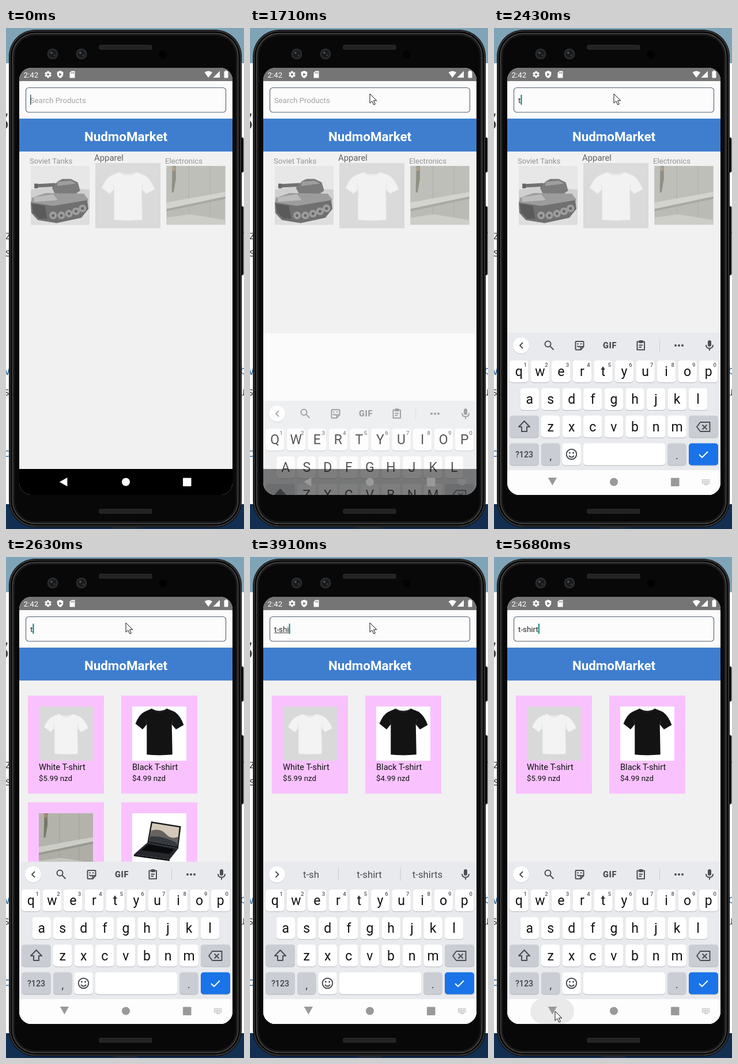
An HTML page for the animation above (5750 ms loop, 413 px wide and 868 px high).

```html
<!DOCTYPE html>
<html lang="en">
<head>
<meta charset="utf-8">
<title>Product search</title>
<style>
  html, body { margin: 0; width: 100%; height: 100%; overflow: hidden; background: #fff; }
  svg { display: block; width: 413px; height: 868px; font-family: Roboto, "Open Sans", sans-serif; }
  .page { font-family: "Open Sans", "Noto Sans", sans-serif; font-size: 20px; fill: #444; }
  .page .link { fill: #27649b; }
  .mid { text-anchor: middle; }
  .line { fill: none; stroke: #4b4e52; stroke-width: 2; stroke-linejoin: round; }
</style>
</head>
<body>
<svg id="stage" viewBox="0 0 413 868" xmlns="http://www.w3.org/2000/svg"></svg>
<script>
const LOOP = 5750;
const stage = document.getElementById('stage');

const rect = (x, y, w, h, fill, r = 0, more = '') =>
  `<rect x="${x}" y="${y}" width="${w}" height="${h}" rx="${r}" fill="${fill}" ${more}/>`;
const circle = (x, y, r, fill, more = '') =>
  `<circle cx="${x}" cy="${y}" r="${r}" fill="${fill}" ${more}/>`;
const path = (d, fill, more = '') => `<path d="${d}" fill="${fill}" ${more}/>`;
const line = (d, more = '') => `<path class="line" d="${d}" ${more}/>`;
const text = (x, y, size, fill, content, more = '') =>
  `<text x="${x}" y="${y}" font-size="${size}" fill="${fill}" ${more}>${content}</text>`;
const group = (id, content, more = '') => `<g id="${id}" ${more}>${content}</g>`;
const place = (x, y, size, content, more = '') =>
  `<g transform="translate(${x} ${y}) scale(${size / 100})" ${more}>${content}</g>`;

// Pictures, each drawn in a 100 x 100 box
const shirt = 'M37 14Q50 21 63 14L76 19Q86 26 91 40L78 47L71 39L72 87Q50 89 29 87L29 39L22 47L10 38Q16 23 25 19Z';
const whiteShirt = rect(0, 0, 100, 100, '#d9d9da') +
  path(shirt, '#f3f3f4', 'stroke="#e9e9eb"') +
  path('M37 14Q50 25 63 14M29 39L27 31M71 39L73 31', 'none', 'stroke="#e3e3e6"');
const blackShirt = rect(0, 0, 100, 100, '#fff') +
  `<g transform="translate(-5 -12.3) scale(1.1 1.16)">${path(shirt, '#131313')}` +
  path('M37 14Q50 25 63 14M29 39L27 31M71 39L73 31', 'none', 'stroke="#2c2c2c"') + '</g>';
const shelf = rect(0, 0, 100, 100, '#aeaea7') +
  path('M0 0H100V44L0 64Z', '#b3b3ac') +
  path('M38 0V100M74 0V100', 'none', 'stroke="#a0a09a"') +
  path('M0 62L100 44V52L0 73Z', '#cdcdc7') + path('M0 73L100 52V56L0 77Z', '#989891') +
  path('M0 88L40 82L100 92V100H0Z', '#c6c6c0') +
  path('M10 0H16V22L12 45H9Z', '#77776a') + rect(10, 1, 5, 7, '#a18e72');
const tank = rect(0, 0, 100, 100, '#e6e6e6') + path('M0 40L30 36L100 40V74H0Z', '#c9c9c9') +
  path('M0 74H100V100H0Z', '#dadada') +
  path('M8 31L42 29V35L8 37Z', '#555') + rect(6, 30, 6, 8, '#484848') +
  path('M36 37L46 26L54 22H68L80 28L84 42L74 49H42Z', '#626262') +
  path('M46 27L68 25L77 30L45 34Z', '#8d8d8d') +
  path('M2 54L25 46L90 47L98 57L92 65L44 70L0 64Z', '#8a8a8a') +
  path('M5 53L38 48L46 58L6 61Z', '#b0b0b0') +
  path('M0 62L38 68L96 58L98 73L86 88L44 97L12 92L1 80Z', '#545454') +
  path('M2 64L24 68L28 90L14 89L4 78Z', '#393939') +
  [[38, 84], [52, 84], [65, 81], [77, 77], [88, 72]]
    .map(([x, y]) => circle(x, y, 6.5, '#8c8c8c') + circle(x, y, 2.5, '#4a4a4a')).join('');
const laptop = rect(0, 0, 100, 100, '#fff') +
  path('M35 15L90 24L85 65L28 54Z', '#17191c') + path('M37 18L87 26L83 61L31 51Z', '#d3c8b9') +
  path('M35 32Q52 27 62 38T85 43L83 61L31 51Z', '#67625f') + path('M33 43Q55 40 83 55V61L31 51Z', '#353a40') +
  path('M3 76L28 54L85 65L69 85Z', '#24272b') + path('M17 68L30 57L77 66L69 75Z', '#090a0c') +
  path('M3 76L69 85V88L3 79Z', '#101114');

function card(x, y, picture, name = '', price = '') {
  return rect(x, y, 132, 170, '#f9c2ff') + place(x + 19, y + 19, 94, picture) +
    text(x + 19, y + 129, 14.6, '#111', name) + text(x + 19, y + 147.5, 13.3, '#111', price);
}

function desktop() {
  return rect(0, 0, 413, 868, '#fff') + rect(0, 0, 413, 61, '#7fa3b7') + rect(0, 825, 413, 43, '#122e50') +
    '<g class="page">' +
    '<text x="-21" y="176" font-size="53" font-weight="700">s</text>' +
    '<text x="-1" y="366">z</text><text x="-1" y="396">s</text><text x="-9" y="601" class="link">w</text>' +
    '<text x="-4" y="637">s</text><text x="-4" y="743" class="link">c</text>' +
    '<text x="407" y="365">r</text><text x="406" y="600" class="link">b</text><text x="403" y="637">u</text></g>';
}

function phone() {
  const ring = (inset, color, width) =>
    rect(5 + inset, 3 + inset, 404 - 2 * inset, 862 - 2 * inset, 'none', 46 - inset, `stroke="${color}" stroke-width="${width}"`);
  const grille = y => rect(161, y, 93, 9, '#292929', 4) + rect(161, y, 93, 9, 'url(#mesh)', 4);
  const lens = x => circle(x, 45, 9.5, '#292b2d') + circle(x, 45, 6.5, '#17191b') +
    circle(x - 2, 43, 2, '#4c5054') + circle(x + 3, 47, 1.5, '#3c4043');
  const button = (y, h) => rect(406, y, 6, h, '#0b0b0b', 2, 'stroke="#3a3a3a"');
  return button(190, 60) + button(309, 119) + rect(186, 863, 43, 4, '#2a3544', 2) +
    rect(5, 3, 404, 862, '#080808', 46) + ring(2, '#3f3f3f', 1.5) + ring(6.5, '#505050', 1.5) + ring(9, '#1b1b1b', 2) +
    grille(29) + grille(833) + lens(81) + lens(131) + circle(272, 46, 7, '#020202');
}

function statusBar() {
  const teeth = [0, 60, 120].map(a => `<rect x="71.3" y="74.7" width="3.4" height="11.6" fill="#fff" transform="rotate(${a} 73 80.5)"/>`).join('');
  return rect(23, 69, 370, 23, '#757575') + text(30.5, 85.5, 13.3, '#fff', '2:42') +
    teeth + circle(73, 80.5, 4.2, '#fff') + circle(73, 80.5, 2, '#757575') +
    path('M94 74L99.3 76.2V80Q99 85 94 87Q89 85 88.7 80V76.2Z', '#fff') + path('M92.3 77.7L97 80.5L92.3 83.3Z', '#757575') +
    path('M113.5 74.5H119.5V86.5H110.5V77.5Z', '#fff') + path('M113.5 76.3V79M115.5 76.3V79M117.5 76.3V79', 'none', 'stroke="#757575"') +
    path('M344.5 77Q351.2 72 358 77L351.2 86Z', '#fff') + path('M371 74.5V86H359.5Z', '#fff') +
    path('M367 79V86H359.8Z', '#fff') + rect(378.5, 75, 7, 11.5, '#fff', 1) + rect(380.4, 73.7, 3.2, 2, '#fff');
}

function content() {
  return rect(23, 69, 370, 740, '#fbfbfb') +
    '<rect id="list" x="23" y="214" width="370" fill="#f1f1f1"/>' +
    group('categories',
      text(41, 235, 13.2, '#949494', 'Soviet Tanks') + text(153, 230, 14.9, '#626262', 'Apparel') +
      text(276, 235, 13.2, '#949494', 'Electronics') +
      place(43, 239, 102, tank, 'opacity=".82"') + place(155, 234, 113, whiteShirt, 'opacity=".92"') +
      placeShelf()) +
    group('results', card(38, 240, whiteShirt, 'White T-shirt', '$5.99 nzd') + card(200, 240, blackShirt, 'Black T-shirt', '$4.99 nzd') +
      group('third', card(38, 425, shelf)) + group('fourth', card(200, 425, laptop))) +
    rect(23, 92, 370, 65, '#fbfbfb') + rect(34.5, 103.5, 347, 42.5, '#fcfcfc', 5, 'stroke="#525f72" stroke-width="1.1"') +
    group('placeholder', text(42, 130, 13.2, '#a2a2a2', 'Search Products')) +
    '<text id="typed" x="42" y="130" font-size="13.4" fill="#222"></text>' +
    rect(42, 131, 0, 1, '#444', 0, 'id="underline"') + rect(42, 115.5, 2, 17.5, '#0b8577', 0, 'id="caret"') +
    rect(23, 157, 370, 57, '#3f7ecf') +
    text(208, 195.5, 22.4, '#fff', 'NudmoMarket', 'class="mid" font-weight="700"') + statusBar();
}

function placeShelf() {
  return place(278.5, 239, 102, shelf, 'opacity=".8"');
}

function key(x, y, w, fill = '#fff') {
  return rect(x, y + 1, w, 38, '#b5b8bd', 5) + rect(x, y, w, 38, fill, 5);
}

function keyboard() {
  const PITCH = 36.55, WIDTH = 32.5, GREY = '#cacdd3', INK = '#4b4e52';
  const letters = (row, x, y) => [...row].map((c, i) => {
    const left = x + i * PITCH;
    return key(left, y, WIDTH) + text(left + WIDTH / 2, y + 27, 23, '#111', c, 'class="mid letter"') +
      (row.length > 9 ? text(left + 27.3, y + 10.5, 9.5, '#555', (i + 1) % 10, 'class="mid" font-weight="500"') : '');
  }).join('');
  const icons = line('M50 545L45 550L50 555') +
    '<circle class="line" cx="93.5" cy="547.5" r="5"/>' + line('M97 551L103.5 557.5') +
    line('M142.5 543H154.5Q155.5 543 155.5 544V552L150.5 557.5H142.5Q141.5 557.5 141.5 556.5V544Q141.5 543 142.5 543ZM150.5 557V552H155M144.5 550.5Q147 554 149.5 551') +
    circle(145.5, 547.2, 1.2, INK) + circle(151, 547.2, 1.2, INK) +
    text(201, 555, 14.5, INK, 'GIF', 'class="mid" font-weight="900" letter-spacing=".6"') +
    line('M248.5 543.5H261V557.5H248.5Z') + rect(251.5, 541, 7, 5, INK, 1) + line('M251.5 549.5H258M251.5 553H256', 'stroke-width="1.5"') +
    rect(287, 539, 1, 21, '#cbcdd1') + [315, 321, 327].map(x => circle(x, 550, 2, INK)).join('');
  const words = line('M44.5 545L49.5 550L44.5 555') + rect(153, 538, 1, 23, '#c5c8cc') + rect(260.5, 538, 1, 23, '#c5c8cc') +
    [106, 207, 308].map(x => text(x, 556, 16.8, INK, '', 'class="mid word"')).join('');
  const mic = rect(371, 541, 6, 11, INK, 3) + line('M368 549Q368 555 374 555T380 549M374 555V559', 'stroke-width="1.7"');
  return rect(23, 528, 370, 300, '#e8eaed') + circle(47, 551, 14.3, '#cfd1d5') + circle(47, 550, 14, '#fff') +
    group('toolbar', group('icons', icons) + group('words', words) + mic) +
    letters('qwertyuiop', 27, 576) + letters('asdfghjkl', 45.5, 624) + letters('zxcvbnm', 82, 671.5) +
    key(27, 671.5, 51, GREY) +
    '<path id="shift" class="line" d="M52.5 681L62 691H57V699H48V691H43Z"/>' +
    key(338, 671.5, 51, GREY) + line('M358 683H374.5V699H358L352 691ZM361.5 687.5L369.5 695.5M369.5 687.5L361.5 695.5') +
    key(27, 719.5, 51, GREY) + text(52.5, 744, 14.2, '#3f4246', '?123', 'class="mid" font-weight="500"') +
    key(82, 719.5, WIDTH, GREY) + text(98.3, 748, 18, '#333', ',', 'class="mid"') +
    key(118.3, 719.5, WIDTH) + '<circle class="line" cx="134.5" cy="738.5" r="8.8"/>' +
    circle(131.3, 736, 1.5, INK) + circle(137.7, 736, 1.5, INK) + line('M130 741Q134.5 746.5 139 741') +
    key(155, 719.5, 142) + key(301, 719.5, WIDTH, GREY) + text(317.3, 747, 18, '#333', '.', 'class="mid"') +
    key(338, 719.5, 51, '#1a73e8') + line('M356 739L361 744L371 734', 'style="stroke:#fff"');
}

function navigation() {
  const dots = [0, 1, 2].map(r => path(`M361 ${783 + r * 2.8}H375`, 'none', 'stroke="#999" stroke-width="1.5" stroke-dasharray="1.6 1.1"')).join('');
  return '<rect id="bar" x="23" width="370" height="60"/>' + rect(63, 765, 76, 44, '#eaeaea', 22, 'id="ripple"') +
    group('buttons', path('M-7.5 0L6 -7.7V7.7Z', 'inherit', 'id="back" style="fill:inherit"') +
      circle(208, 786.5, 7, 'inherit', 'style="fill:inherit"') + rect(307, 779.5, 14.5, 14.5, 'inherit', .8, 'style="fill:inherit"')) +
    group('hide', dots + rect(365, 790.5, 6, 1, '#999'));
}

stage.innerHTML = `<defs>
  <clipPath id="screen"><rect x="23" y="69" width="370" height="740" rx="21"/></clipPath>
  <pattern id="mesh" width="3" height="3" patternUnits="userSpaceOnUse"><circle cx="1.5" cy="1.5" r=".8" fill="#0b0b0b"/></pattern>
  </defs>` + desktop() + phone() +
  `<g clip-path="url(#screen)">${content()}${group('keyboard', keyboard())}${navigation()}</g>` +
  group('pointer', path('M0 0V16.2L3.8 12.7L6.8 19L9.3 17.9L6.5 11.8H11.8Z', '#fff', 'stroke="#111" stroke-linejoin="round"'));

const el = Object.fromEntries([...stage.querySelectorAll('[id]')].map(e => [e.id, e]));
const letterKeys = [...stage.querySelectorAll('.letter')];
const wordSlots = [...stage.querySelectorAll('.word')];

// Timelines: [time, value...]
const typing = [[0, ''], [2360, 't'], [3110, 't-'], [3510, 't-s'], [3700, 't-sh'], [3840, 't-shi'], [4250, 't-shir'], [4310, 't-shirt']];
const marked = [[0, 0], [2700, 1], [3110, 2], [3570, 3], [3770, 4], [3900, 5], [4250, 6], [4530, 7], [5610, 0]];
const suggestions = [[0, ''], [2700, 't the to'], [3570, 't-s t-shirt t-shirts'], [3770, 't-sh t-shirt t-shirts'],
  [4110, 't-shi t-shirt t-shirts'], [4310, 't-shir t-shirt t-shirts'], [4590, 't-shirts t-shirt tshirt'], [5610, '']];
const pointerPath = [[460, 337, 745], [530, 285, 440], [600, 238, 220], [670, 212, 130], [940, 212, 130], [1010, 211, 112], [1080, 210, 100],
  [1150, 210, 107], [1300, 208, 114], [4990, 208, 114], [5270, 310, 370], [5540, 390, 663], [5610, 240, 738], [5680, 106, 787]];
const rise = [[1570, 240, 0], [1710, 119.8, .7], [1770, 20, .93], [1830, 1.7, 1], [1900, 0, 1]];
const turn = [[1710, 0], [1770, -40], [1830, -70], [1900, -84], [1970, -90]];
const buttonShade = [[940, 255], [1150, 240], [1510, 215], [1570, 185], [1710, 153]];

const at = (track, t) => track.filter(step => step[0] <= t).pop()[1];
function tween(track, t) {
  const next = track.findIndex(step => step[0] > t);
  if (next < 0) return track[track.length - 1].slice(1);
  if (next === 0) return track[0].slice(1);
  const a = track[next - 1], b = track[next], k = (t - a[0]) / (b[0] - a[0]);
  return a.slice(1).map((v, i) => v + (b[i + 1] - v) * k);
}
const show = (e, on) => e.setAttribute('display', on ? 'inline' : 'none');
const set = (e, attrs) => { for (const name in attrs) e.setAttribute(name, attrs[name]); };
const write = (e, s) => { if (e.textContent !== s) e.textContent = s; };

function drawSearch(t) {
  const typed = at(typing, t), count = Math.min(at(marked, t), typed.length);
  write(el.typed, typed);
  show(el.placeholder, !typed);
  set(el.underline, { width: count ? el.typed.getSubStringLength(0, count) : 0 });
  const width = typed ? el.typed.getComputedTextLength() : 0;
  set(el.caret, { x: 42 + width, width: t < 460 ? 1.5 : 2, fill: t < 460 ? '#3c5558' : '#0b8577' });
  show(el.caret, t < 460 || (t >= 940 && t < 1480) || (t >= 2360 && t < 4990) || t >= 5490);

  show(el.categories, t < 2630);
  show(el.results, t >= 2630);
  show(el.third, t < 3700);
  show(el.fourth, t < 3310);
  set(el.list, { height: (t < 1710 ? 764 : 529) - 214 + (t >= 1830 ? 4 : 0) });
}

function drawKeyboard(t) {
  const [dy, opacity] = tween(rise, t);
  show(el.keyboard, t >= 1700);
  set(el.keyboard, { transform: `translate(0 ${dy})`, opacity });
  set(el.toolbar, { opacity });
  const upper = t < 2430;
  letterKeys.forEach(e => write(e, upper ? e.textContent.toUpperCase() : e.textContent.toLowerCase()));
  el.shift.style.fill = upper ? '#3c3f43' : 'none';
  const words = at(suggestions, t);
  show(el.icons, !words);
  show(el.words, words);
  words.split(' ').forEach((word, i) => write(wordSlots[i], word));
}

function drawNavigation(t) {
  const light = t >= 1770;
  set(el.bar, { y: light ? 766 : 764, fill: light ? '#fdfdfd' : '#000',
    'fill-opacity': t < 1700 ? 1 : t < 1770 ? .5 : t < 1830 ? .8 : 1 });
  const shade = Math.round(tween(buttonShade, t)[0]);
  set(el.buttons, { fill: `rgb(${shade},${shade},${shade})` });
  const [angle] = tween(turn, t);
  set(el.back, { transform: `translate(${100.4 - angle / 90} ${786.5 + angle / 60}) rotate(${angle})` });
  show(el.hide, t >= 1570);
  show(el.ripple, t >= 5670);
}

function draw(t) {
  drawSearch(t);
  drawKeyboard(t);
  drawNavigation(t);
  show(el.pointer, t >= 460);
  set(el.pointer, { transform: `translate(${tween(pointerPath, t).join(' ')})` });
}

const start = performance.now();
function tick() {
  draw((performance.now() - start) % LOOP);
  requestAnimationFrame(tick);
}
tick();
</script>
</body>
</html>
```
